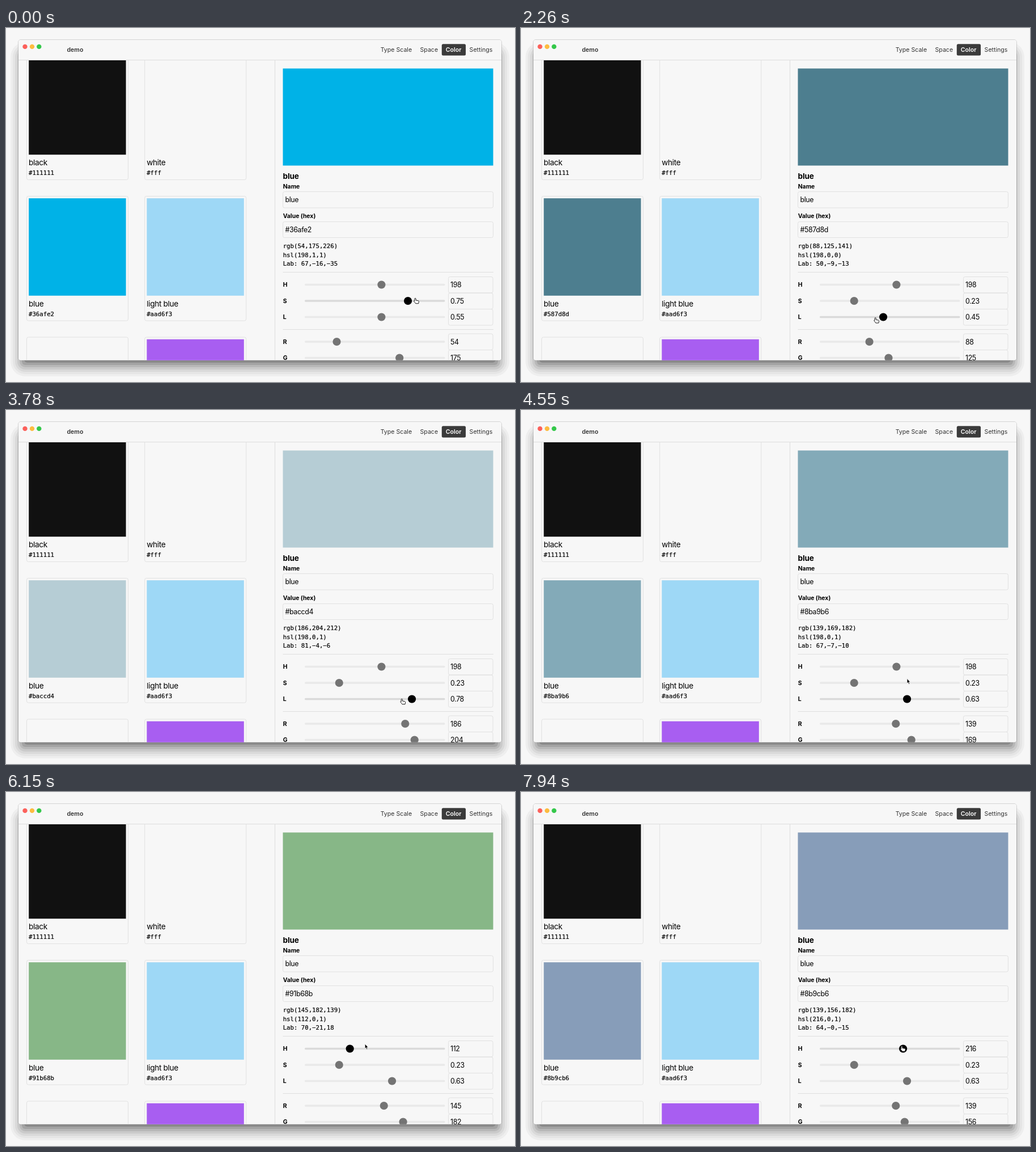
Write an HTML page that moves like this. It is 898 px wide and 624 px high and loops after 8000 ms.

```html
<!DOCTYPE html>
<html lang="en">
<head>
<meta charset="utf-8">
<title>Color editor</title>
<style>
html, body { margin: 0; width: 100%; height: 100%; overflow: hidden; background: #f7f7f7; }
svg { display: block; }
text { font: 10.5px Inter, sans-serif; fill: #000; white-space: pre; }
.nav { fill: #333; font-size: 10.6px; }
.semi { font-weight: 600; }
.bold { font-weight: 700; font-size: 10.4px; }
.title { font-size: 13.7px; letter-spacing: -.025em; }
.head { font-size: 13.6px; font-weight: 700; letter-spacing: -.01em; }
.field { font-size: 12.4px; letter-spacing: -.03em; }
.mono { font: 10.68px "DejaVu Sans Mono", monospace; stroke: #000; stroke-width: .2; }
.box { fill: none; stroke: #e1e1e1; }
.line { stroke: #dedede; }
.blank { fill: none; }
.black { fill: #111; }
.pale { fill: color(display-p3 .6667 .8392 .9529); }
.violet { fill: #a85ef1; }
</style>
</head>
<body>
<svg width="898" height="624" viewBox="0 0 898 624">
  <defs>
    <clipPath id="body"><path d="M22 57H874V581.7a4 4 0 0 1-4 4H26a4 4 0 0 1-4-4Z"/></clipPath>
  </defs>
  <g id="shadow"></g>
  <rect x="21.5" y="20.5" width="853" height="565.5" rx="4.5" fill="none" stroke="#000" stroke-opacity=".14"/>
  <rect x="22" y="21" width="852" height="564.7" rx="4" fill="#f7f7f7"/>
  <circle cx="33.5" cy="32.9" r="4.2" fill="#fc605b"/>
  <circle cx="46" cy="32.9" r="4.2" fill="#fdbc40"/>
  <circle cx="58.3" cy="32.9" r="4.2" fill="#34c84a"/>
  <text class="nav semi" x="107.5" y="42.2">demo</text>
  <text class="nav" x="660.7" y="42.2">Type Scale</text>
  <text class="nav" x="730.5" y="42.2">Space</text>
  <rect x="768.8" y="28.2" width="42.3" height="20.4" rx="2.5" fill="#3b3b3b"/>
  <text class="nav semi" x="775.8" y="42.2" style="fill:#fff">Color</text>
  <text class="nav" x="817.6" y="42.2">Settings</text>
  <path class="line" d="M22 56.5H874"/>
  <g clip-path="url(#body)">
    <path class="line" d="M474.5 57V586M488.5 430.5H860M488.5 531.5H860"/>
    <g id="cards"></g>
    <rect id="preview" x="488.5" y="71.4" width="371" height="171.1"/>
    <text class="head" x="488.5" y="265.5">blue</text>
    <text class="bold" x="488.7" y="282.8">Name</text>
    <rect class="box" x="488.5" y="288.5" width="371" height="28.5" rx="3"/>
    <text class="field" x="492.5" y="307">blue</text>
    <text class="bold" x="488.7" y="335.4">Value (hex)</text>
    <rect class="box" x="488.5" y="341.5" width="371" height="28" rx="3"/>
    <text class="field" id="hex" x="492.5" y="360.4"></text>
    <text class="mono" id="rgb" x="488.7" y="388.2"></text>
    <text class="mono" id="hsl" x="488.7" y="403.7"></text>
    <text class="mono" id="lab" x="488.7" y="419.2"></text>
    <g id="sliders"></g>
  </g>
  <path id="hand" fill="#fff" stroke="#000" stroke-width=".9" stroke-linejoin="round"
    d="M-2.2-4.7c.8 0 1.1.5 1.1 1.3V-1l3.7.6c1 .2 1.6.8 1.5 1.9L3.5 4.7H-1.5C-2.4 3.2-3.6 2-4.4.9c-.6-.9.4-1.7 1.1-.9V-3.4c0-.8.4-1.3 1.1-1.3Z"/>
  <path id="arrow" stroke="#fff" stroke-width=".7" d="M0-5V3.3L1.8 1.7 3.2 4.8 4.6 4.2 3.3 1.2H5.8Z"/>
</svg>
<script>
const $ = id => document.getElementById(id);

function add(parent, tag, attrs, text = '') {
  const el = document.createElementNS('http://www.w3.org/2000/svg', tag);
  for (const k in attrs) el.setAttribute(k, attrs[k]);
  el.textContent = text;
  return parent.appendChild(el);
}

// Window shadow in visible bands, darker towards the middle
for (let k = 0; k < 7; k++) {
  const grow = 14 - 4 * k, grey = 238 - 7.5 * k - 1.5 * k * k;
  add($('shadow'), 'rect', {
    x: 22 - grow, y: 39 - grow, width: 852 + 2 * grow, height: 561 + 2 * grow,
    rx: 12 + Math.max(grow, -6), fill: `rgb(${grey},${grey},${grey})`
  });
}

function card(col, row, name, hex, cls) {
  const g = $('cards'), x = 36.5 + 208.2 * col, y = 48 + 248.5 * row;
  add(g, 'rect', { class: 'box', x, y, width: 179, height: 219.5, rx: 3 });
  const swatch = add(g, 'rect', { class: cls, x: x + 3.7, y: y + 3.7, width: 171.4, height: 171.6 });
  add(g, 'text', { class: 'title', x: x + 3.5, y: y + 194 }, name);
  const label = add(g, 'text', { class: 'mono', x: x + 3.5, y: y + 211.2 }, hex);
  return { swatch, label };
}
card(0, 0, 'black', '#111111', 'black');
card(1, 0, 'white', '#fff', 'blank');
const blue = card(0, 1, 'blue', '', '');
card(1, 1, 'light blue', '#aad6f3', 'pale');
card(0, 2, '', '', 'blank');
card(1, 2, '', '', 'violet');

const thumbX = part => 534.1 + 233.3 * part;

function slider(name, y, max) {
  const g = $('sliders');
  add(g, 'text', { class: 'bold', x: 488.7, y: y + 3.7 }, name);
  const track = add(g, 'rect', { x: 527, y: y - 1.75, width: 247.5, height: 3.5, rx: 1.7 });
  const thumb = add(g, 'circle', { cy: y, r: 7.1 });
  add(g, 'rect', { class: 'box', x: 780.5, y: y - 14, width: 78.5, height: 28.5, rx: 3 });
  const label = add(g, 'text', { class: 'field', x: 784, y: y + 4.6 });
  return {
    y, max,
    set(v, active) {
      track.setAttribute('fill', active ? '#dadada' : '#e9e9e9');
      thumb.setAttribute('fill', active ? '#000' : '#747474');
      thumb.setAttribute('cx', thumbX(v / max));
      label.textContent = v;
    }
  };
}
const sliders = [
  slider('H', 452.5, 360), slider('S', 481, 1), slider('L', 509.5, 1),
  slider('R', 553, 255), slider('G', 581.5, 255)
];

// The screen refreshes about every 240 ms; the spans are split evenly into beats
const LOOP = 8000, marks = [0, 920, 3240, 4550, 6150, 6870, 7940];
const beats = [0];
for (let i = 1; i < marks.length; i++) {
  const from = marks[i - 1], span = marks[i] - from, n = Math.round(span / 240);
  for (let k = 1; k <= n; k++) beats.push(from + span * k / n);
}

// Turning points of each drag as [beat, value], and of the pointer height
const drags = [
  [[20, 198], [24, 92], [26, 112], [27, 153], [29, 297], [30, 315], [33, 216]],
  [[0, .75], [1, .815], [2, .81], [4, .31], [5, .23]],
  [[7, .55], [10, .4], [14, .77], [15, .84], [18, .65], [19, .63]]
];
const height = [[5, 481], [7, 515], [14, 516], [18, 512], [20, 445], [26, 449], [29, 461.5], [33, 452.5]];

function at(keys, b) {
  const k = keys.findIndex(p => p[0] > b);
  if (k < 0) return keys[keys.length - 1][1];
  if (k === 0) return keys[0][1];
  const [b0, v0] = keys[k - 1], [b1, v1] = keys[k];
  return v0 + (v1 - v0) * (b - b0) / (b1 - b0);
}

function toRgb([h, s, l]) {
  const a = s * Math.min(l, 1 - l);
  return [0, 8, 4].map(n => {
    const k = (n + h / 30) % 12;
    return Math.round(255 * (l - a * Math.max(-1, Math.min(k - 3, 9 - k, 1))));
  });
}

function toLab(rgb) {
  const [r, g, b] = rgb.map(v => ((v / 255 + .055) / 1.055) ** 2.4);
  const x = Math.cbrt((.4124 * r + .3576 * g + .1805 * b) / .95047);
  const y = Math.cbrt(.2126 * r + .7152 * g + .0722 * b);
  const z = Math.cbrt((.0193 * r + .1192 * g + .9505 * b) / 1.08883);
  return [116 * y - 16, 500 * (x - y), 200 * (y - z)];
}

function draw(beat) {
  const hsl = drags.map((keys, i) => i ? Math.round(at(keys, beat) * 100) / 100 : Math.round(at(keys, beat)));
  const rgb = toRgb(hsl);
  $('hex').textContent = blue.label.textContent =
    '#' + rgb.map(v => v.toString(16).padStart(2, '0')).join('');
  $('rgb').textContent = `rgb(${rgb})`;
  $('hsl').textContent = `hsl(${hsl.map(Math.round)})`;
  $('lab').textContent = 'Lab: ' + toLab(rgb).map(v => v.toFixed(0).replace('-', '−'));
  blue.swatch.style.fill = $('preview').style.fill =
    `color(display-p3 ${rgb.map(v => (v / 255).toFixed(4)).join(' ')})`;

  const active = beat < 6 ? 1 : beat < 20 ? 2 : 0;
  [...hsl, rgb[0], rgb[1]].forEach((v, i) => sliders[i].set(v, i === active));

  // The thumb trails the pointer by one beat; above the track the hand becomes an arrow
  const { y: rowY, max } = sliders[active];
  const x = thumbX(at(drags[active], beat + 1) / max), y = at(height, beat);
  const above = y < rowY - 3;
  $('arrow').style.display = above ? '' : 'none';
  $('hand').style.display = above ? 'none' : '';
  $(above ? 'arrow' : 'hand').setAttribute('transform', `translate(${x} ${y})`);
}

let last = -1;
function frame() {
  const now = performance.now() % LOOP;
  const beat = beats.filter(t => t <= now).length - 1;
  if (beat !== last) draw(last = beat);
  requestAnimationFrame(frame);
}
frame();
</script>
</body>
</html>
```
